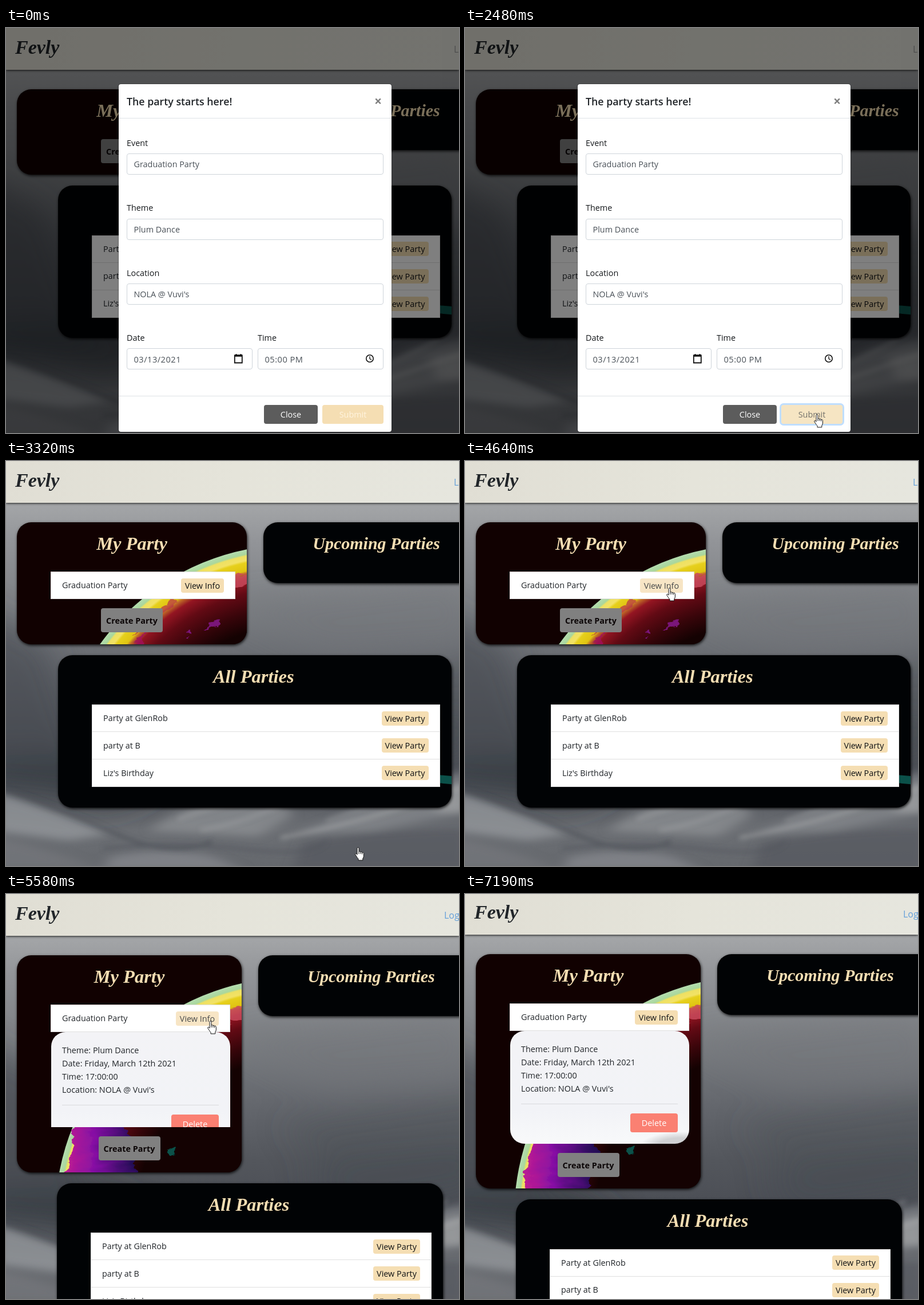
Animation of 792 by 707 pixels, one loop 8.58 s. Source, as an HTML page:

```html
<!DOCTYPE html>
<html lang="en">
<head>
<meta charset="utf-8">
<title>Party planner</title>
<style>
html, body { margin: 0; width: 100%; height: 100%; overflow: hidden; }
body { position: relative; background: #666a70; color: #212529; font: 14.4px/24px "Open Sans", "Noto Sans", sans-serif; white-space: nowrap; }
body * { box-sizing: border-box; }
#stage { position: absolute; left: 0; top: 0; width: 792px; height: 707px; overflow: hidden; }
#sky, #page, #page > *, .card > *, #modal, #modal > *, #shade, .cursor { position: absolute; }
#page { --w: 402px; --up: 450px; --allX: 91px; --allW: 687.5px; --link: 783px; left: 0; top: 0; width: 792px; height: 1000px; }
#page.narrow { --w: 393px; --up: 441px; --allX: 89px; --allW: 675px; --link: 766px; }

#nav { left: 0; top: 0; width: 792px; background: linear-gradient(100deg, #e0ded4, #e5e4da 50%, #e6e6de); box-shadow: 0 1px 4px rgba(0, 0, 0, .85); }
.script { font: italic bold 32.5px/74px "Liberation Serif", serif; color: #f5deb3; }
#logo { position: absolute; left: 16px; top: 0; font-size: 34px; line-height: 67px; color: #212529; }
#link { position: absolute; left: var(--link); font-size: 16px; }

.card { border-radius: 25px; overflow: hidden; background: #010305; box-shadow: 1px 2px 5px rgba(0, 0, 0, .85); }
.card .script { left: 0; right: 0; top: 0; text-align: center; }
#my { left: 19px; top: 34px; width: var(--w); background: #110101; }
#up { left: var(--up); width: 395px; height: 106px; }
#up .script { font-size: 30px; }
#all { left: var(--allX); width: var(--allW); }
#all .script { right: 4px; }
.teal { right: -4px; top: 210px; width: 34px; height: 14px; background: #0b5049; transform: rotate(5deg); }

.list { left: 59px; right: 20px; top: 86.5px; }
#my .list { top: 86px; }
.row { display: flex; justify-content: space-between; align-items: center; height: 48px; padding: 0 19px; background: #fff; border: 1px solid #dfdfdf; }
.row + .row { border-top: 0; }
.tag { width: 82px; height: 25px; text-align: center; line-height: 26px; border-radius: 4px; background: #f5deb3; color: #101214; }
#info { width: 75px; }
#info.hover { opacity: .76; }
#detail { overflow: hidden; }
#panel { position: relative; height: 196.5px; margin: 0 .5px; padding: 20px 19.5px; border-radius: 25px; overflow: hidden; line-height: 23px;
  background: radial-gradient(ellipse 75px 27px at 96% 103%, #d0d1d3 60%, transparent 100%), linear-gradient(#f3f3f6, #f2f3f7 70%, #f8f9fa); }
#panel hr { position: absolute; left: 19.5px; right: 19.5px; top: 127px; margin: 0; border: 0; border-top: 1px solid #d9dadd; }
.btn { border-radius: 4px; text-align: center; color: #fff; line-height: 33px; height: 33px; }
#delete { position: absolute; right: 19.5px; top: 144px; width: 83px; background: #fa8072; }
#create { left: 50%; bottom: 20.5px; width: 108px; height: 42px; margin-left: -54px; background: #808080; color: #0b0506; font-weight: bold; line-height: 43px; }

#shade { inset: 0; background: rgba(0, 0, 0, .5); }
#modal { left: 196px; top: 97px; width: 479px; height: 609px; background: #fff; border: 1px solid rgba(0, 0, 0, .2); border-radius: 5px; background-clip: padding-box; }
#modal > * { left: 14px; }
#modal h2 { margin: 0; top: 18px; font-size: 17.8px; font-weight: 600; }
#modal .x { left: 447px; top: 17px; font-size: 23px; font-weight: bold; color: #7f7f7f; }
#modal .line { left: 0; right: 0; height: 1px; background: #dee2e6; }
#modal label { color: #15181b; }
.field { width: 448.5px; height: 37px; padding-left: 11.5px; border: 1px solid #ced4da; border-radius: 4px; line-height: 36px; color: #495057; }
.half { width: 220px; letter-spacing: .5px; font-size: 14.6px; }
#modal .right { left: 243px; }
.field svg { position: absolute; right: 14px; top: 7px; fill: none; stroke: #111; }
#modal #close { left: 254px; top: 560px; width: 94px; background: #5c5c5c; }
#modal #submit { left: 356px; top: 560px; width: 107px; background: #f5deb3; color: #fff4df; }
#modal #submit.hover { background: #f6e5c3; color: #73716b; }
.cursor { left: 0; top: 0; overflow: visible; fill: #fff; stroke: #111; }
</style>
</head>
<body>
<div id="stage">
  <svg id="sky" width="792" height="707">
    <defs>
      <linearGradient id="storm" x2="0" y2="1">
        <stop offset=".1" stop-color="#a5a7a9"/><stop offset=".2" stop-color="#929498"/>
        <stop offset=".36" stop-color="#7c7f83"/><stop offset=".52" stop-color="#64676d"/>
        <stop offset=".66" stop-color="#53565c"/><stop offset=".77" stop-color="#4b4e55"/>
        <stop offset=".84" stop-color="#5b5e64"/><stop offset=".91" stop-color="#6c6f74"/>
        <stop offset="1" stop-color="#65686d"/>
      </linearGradient>
      <filter id="soft" x="-30%" y="-30%" width="160%" height="160%"><feGaussianBlur stdDeviation="26"/></filter>
      <filter id="mist" x="-30%" y="-30%" width="160%" height="160%"><feGaussianBlur stdDeviation="11 7"/></filter>
      <filter id="wisp" x="-30%" y="-30%" width="160%" height="160%"><feGaussianBlur stdDeviation="4"/></filter>
    </defs>
    <rect width="792" height="707" fill="url(#storm)"/>
    <g filter="url(#soft)">
      <path d="M-60 250L70 320L150 560L-60 570Z" fill="#444850" opacity=".6"/>
      <path d="M-40 520L180 510L280 570L180 610L-40 560Z" fill="#34383f" opacity=".6"/>
      <path d="M480 400L850 350V500L600 520Z" fill="#4c5056" opacity=".4"/>
      <path d="M380 250L800 200L820 320L560 340Z" fill="#74777b" opacity=".5"/>
      <path d="M520 480L820 450V520L560 570Z" fill="#474b52" opacity=".5"/>
    </g>
    <g filter="url(#mist)">
      <path d="M-20 577Q60 600 180 652L110 662L-20 645Z" fill="#93969a" opacity=".8"/>
      <path d="M250 645Q340 580 440 588Q490 590 500 620L440 655Z" fill="#95989b" opacity=".6"/>
      <path d="M510 650Q640 600 710 560L810 540V612L640 645Z" fill="#8e9194" opacity=".6"/>
      <path d="M740 575L810 560V615L755 615Z" fill="#a7a9ab" opacity=".6"/>
      <path d="M520 665Q660 640 810 640V715H500Z" fill="#54585f" opacity=".7"/>
      <path d="M180 692Q270 672 360 690L420 715H170Z" fill="#8f9296" opacity=".6"/>
      <path d="M-20 655Q80 680 170 712H-20Z" fill="#75787c" opacity=".7"/>
    </g>
    <g filter="url(#wisp)" fill="none" stroke-width="6">
      <path d="M-10 570Q90 605 190 650T360 664" stroke="#44484f" opacity=".55"/>
      <path d="M480 658Q620 630 700 602T800 568" stroke="#adb0b2" opacity=".5"/>
      <path d="M560 628Q680 590 770 535" stroke="#a0a3a6" opacity=".4"/>
      <path d="M300 625Q370 600 430 590M340 645Q420 630 480 600" stroke="#a7aaac" opacity=".4"/>
      <path d="M170 676Q300 664 420 678T560 662" stroke="#54585e" opacity=".6"/>
    </g>
  </svg>

  <div id="page">
    <div id="nav"><span id="logo" class="script">Fevly</span><span id="link">Logout</span></div>
    <div id="my" class="card">
      <svg width="402" height="420">
        <defs>
          <radialGradient id="planet" gradientUnits="userSpaceOnUse" cx="484" cy="456" r="417">
            <stop offset=".66" stop-color="#140202"/><stop offset=".74" stop-color="#38050a"/>
            <stop offset=".82" stop-color="#620a14"/><stop offset=".875" stop-color="#941522"/>
            <stop offset=".9" stop-color="#c06a28"/><stop offset=".912" stop-color="#e0c412"/>
            <stop offset=".945" stop-color="#e6d01c"/><stop offset=".955" stop-color="#f2e266"/>
            <stop offset=".973" stop-color="#eee062"/><stop offset=".98" stop-color="#a9d79c"/>
            <stop offset="1" stop-color="#b4dcaf"/>
          </radialGradient>
          <linearGradient id="violet" x2="1"><stop stop-color="#c31d90"/><stop offset=".4" stop-color="#8510a4"/><stop offset="1" stop-color="#18104c"/></linearGradient>
          <filter id="paint" x="0" y="0" width="100%" height="100%">
            <feTurbulence type="fractalNoise" baseFrequency=".03 .07" numOctaves="3" seed="4"/>
            <feDisplacementMap in="SourceGraphic" scale="24" xChannelSelector="R" yChannelSelector="G"/>
          </filter>
        </defs>
        <circle cx="484" cy="456" r="417" fill="url(#planet)"/>
        <g filter="url(#paint)">
          <path d="M410 88L350 100L300 122L340 118L410 108Z" fill="#c84a5c" opacity=".85"/>
          <path d="M300 118L240 155L200 200L250 165Z" fill="#b8304a" opacity=".7"/>
          <path d="M230 190L160 260L140 330L200 250Z" fill="#a01560" opacity=".8"/>
          <path d="M335 178l22-4-8 12-18 2zM290 194l15-4-4 10z" fill="#7a1479"/>
          <path d="M100 300L185 290L215 345L190 425H82L92 360Z" fill="url(#violet)"/>
          <path d="M262 340l14-5 3 8-12 9z" fill="#075148"/>
        </g>
      </svg>
      <div class="script">My Party</div>
      <div class="list" id="mine">
        <div class="row"><span>Graduation Party</span><span class="tag" id="info">View Info</span></div>
        <div id="detail"><div id="panel">Theme: Plum Dance<br>Date: Friday, March 12th 2021<br>Time: 17:00:00<br>Location: NOLA @ Vuvi's<hr><div class="btn" id="delete">Delete</div></div></div>
      </div>
      <div class="btn" id="create">Create Party</div>
    </div>
    <div id="up" class="card"><div class="script">Upcoming Parties</div></div>
    <div id="all" class="card">
      <div class="teal"></div>
      <div class="script">All Parties</div>
      <div class="list" id="rows">
        <div class="row"><span>Party at GlenRob</span><span class="tag">View Party</span></div>
        <div class="row"><span>party at B</span><span class="tag">View Party</span></div>
        <div class="row"><span>Liz's Birthday</span><span class="tag">View Party</span></div>
      </div>
    </div>
  </div>

  <div id="dialog">
    <div id="shade"></div>
    <div id="modal">
      <h2>The party starts here!</h2><span class="x">×</span>
      <div class="line" style="top:59px"></div>
      <label style="top:91px">Event</label><div class="field" style="top:121px">Graduation Party</div>
      <label style="top:204px">Theme</label><div class="field" style="top:234.5px">Plum Dance</div>
      <label style="top:318px">Location</label><div class="field" style="top:348px">NOLA @ Vuvi's</div>
      <label style="top:431px">Date</label>
      <div class="field half" style="top:461px">03/13/2021<svg width="20" height="22"><path d="M3.8 4.5h13v13h-13zM6.5 2v3M14.5 2v3" stroke-width="1.8"/><path d="M4 5h13" stroke-width="3.4"/></svg></div>
      <label class="right" style="top:431px">Time</label>
      <div class="field half right" style="top:461px">05:00 PM<svg width="20" height="22"><circle cx="11" cy="10" r="6.2" stroke-width="1.6"/><path d="M11 6v4.4l3 1.8" stroke-width="1.3"/></svg></div>
      <div class="line" style="top:544px"></div>
      <div class="btn" id="close">Close</div><div class="btn" id="submit">Submit</div>
    </div>
  </div>

  <svg id="hand" class="cursor" width="17" height="25"><path d="M4 2.5Q4 .7 5.5 .7T7 2.5V8Q8.8 6.8 10 8.6Q11.5 7.7 12.6 9.3Q14.3 8.7 15 10.2Q15.5 11 15.4 13V16Q15.3 18 13.8 20V23H6V20.5Q4 18.5 3 16.5L.9 13.3Q.3 11.6 1.6 11.3Q2.8 11.3 4 13.2Z"/><path d="M7 8v4M10 8.6V12M12.7 9.5V12.5" fill="none"/></svg>
  <svg id="arrow" class="cursor" width="13" height="20"><path d="M.5 .8V16.6L4.1 13.2L6.5 18.8L8.9 17.8L6.5 12.3H11.6Z"/></svg>
</div>

<script>
const LOOP = 8580;
const el = Object.fromEntries([...document.querySelectorAll("[id]")].map(e => [e.id, e]));
const show = (e, on) => { e.style.display = on ? "" : "none"; };
const px = (e, prop, v) => { e.style[prop] = v + "px"; };
const mix = (a, b, p) => a.map((v, i) => Math.round(v + (b[i] - v) * p));
const smooth = p => p * p * (3 - 2 * p);

// Number of the current step when `count` changes are spread evenly over start..end.
const step = (t, start, end, count) =>
  Math.max(-1, Math.min(count - 1, Math.floor((t - start) / ((end - start) / (count - 1)) + 1e-6)));

function pointer(t) {
  const submit = [616, 674], info = [358, 221];
  if (t < 530) return null;
  if (t < 1610) {
    const k = step(t, 530, 830, 5);
    return { at: mix([682, 690], [614, 674], smooth(k / 4)), hand: k > 1 };
  }
  if (t < 3800) return { at: submit, hand: true };
  if (t < 5660) {
    const k = step(t, 3800, 4640, 12);
    return { at: mix(submit, info, smooth((k + 1) / 12)), hand: k > 10 };
  }
  if (t < 5970) return { at: [358, 225], hand: true };
  if (t < 6970) {
    const k = step(t, 5970, 6200, 4);
    return k < 2 ? { at: [358, 227 + 2 * k], hand: true } : { at: [355, 231], hand: false };
  }
  const k = step(t, 6970, 7190, 4);
  return k < 3 ? { at: mix([355, 231], [672, 626], (k + 1) / 3), hand: false } : null;
}

function render(t) {
  const modal = t < 3090, loading = !modal && t < 3320, loaded = t >= 3320;
  const opening = step(t, 5340, 5740, 6);
  const detail = opening < 0 ? 0 : [0, 17, 106, 166, 189, 196.5][opening];
  const scroll = t >= 6660 ? 2 : t >= 6580 ? 1 : 0;
  const nav = loading ? 54.5 : 73, top = nav + 34;
  const myHeight = loaded ? 212.5 + detail : 149;

  el.page.className = t >= 5500 ? "narrow" : "";
  px(el.page, "top", -scroll);
  px(el.nav, "height", nav);
  show(el.logo, !loading);
  px(el.link, "top", nav / 2 - 12);
  el.link.style.color = loaded ? "#64a0da" : "#9b9c9b";
  px(el.my, "top", top);
  px(el.my, "height", myHeight);
  px(el.up, "top", top);
  px(el.all, "top", top + myHeight + 19);
  px(el.all, "height", loading ? 106 : 266);
  show(el.mine, loaded);
  show(el.rows, !loading);
  px(el.detail, "height", detail);
  el.info.classList.toggle("hover", t >= 4640 && t < 6120);

  show(el.dialog, modal);
  el.submit.classList.toggle("hover", t >= 680);
  const ring = (step(t, 2310, 2480, 3) + 1) / 3;
  el.submit.style.boxShadow = ring ? `0 0 0 ${3 * ring}px rgba(0,123,255,${.25 * ring})` : "none";

  const p = pointer(t);
  show(el.hand, p && p.hand);
  show(el.arrow, p && !p.hand);
  if (p) {
    const [x, y] = p.at;
    el.hand.style.transform = `translate(${x - 6}px, ${y}px)`;
    el.arrow.style.transform = `translate(${x}px, ${y}px)`;
  }
}

const begun = performance.now();
function tick() {
  render((performance.now() - begun) % LOOP);
  requestAnimationFrame(tick);
}
tick();
</script>
</body>
</html>
```
